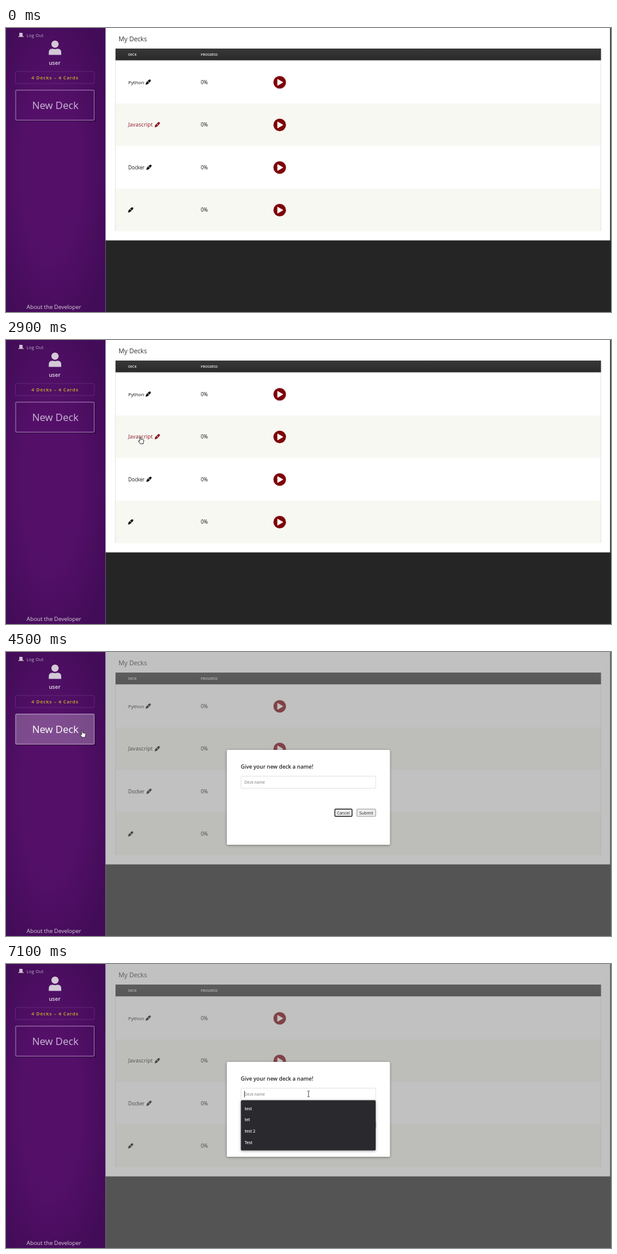
An HTML page for the animation above (7200 ms loop, 1000 by 470 pixels).

```html
<!DOCTYPE html>
<html lang="en">
<head>
<meta charset="utf-8">
<title>My Decks</title>
<style>
  html, body { margin: 0; width: 100%; height: 100%; overflow: hidden; background: #252525; }
  svg { display: block; width: 1000px; height: 470px; font-family: "Open Sans", sans-serif; }
  .mid { text-anchor: middle; }
  .bold { font-weight: 600; }
  .deck { fill: #111; }
  .deck.hover { fill: #8b0a1c; }
  #new rect { fill: #fff; fill-opacity: 0; stroke: #8c5f9d; stroke-width: 1.4; }
  #new text { fill: #ccb8d5; }
  #new.hover rect { fill-opacity: .25; stroke: #a582b2; }
  #new.hover text { fill: #fff; }
</style>
</head>
<body>
<svg viewBox="0 0 1000 470">
  <defs>
    <radialGradient id="purple" cx=".45" cy=".5" r=".62">
      <stop offset=".45" stop-color="#541069"/>
      <stop offset="1" stop-color="#430c58"/>
    </radialGradient>
    <linearGradient id="head" x2="0" y2="1">
      <stop stop-color="#383838"/>
      <stop offset="1" stop-color="#2a2a2c"/>
    </linearGradient>
    <filter id="shadow" x="-10%" y="-10%" width="120%" height="125%">
      <feDropShadow dx="0" dy="1" stdDeviation="2" flood-opacity=".4"/>
    </filter>
    <path id="pen" d="M-4.3 4.4 L-3.5 1 L-1.6-1.4 L1.6 1.6 L-.9 3.5 Z M-1-2 L2-4.2 Q3.4-4.7 4.2-3.6 Q4.8-2.7 4.1-1.7 L2.1 1 Z"/>
    <g id="play">
      <circle r="10.4" fill="#7d0308"/>
      <path d="M-3.4-5 L5.2 0 L-3.4 5 Z" fill="#fff" stroke="#fff" stroke-linejoin="round"/>
    </g>
  </defs>

  <rect x="164" width="836" height="470" fill="#252525"/>
  <rect x="164" width="834.5" height="351.5" fill="#fff"/>
  <text x="186" y="22" font-size="10.6" fill="#333">My Decks</text>
  <g id="table"></g>

  <rect width="164.5" height="470" fill="url(#purple)"/>
  <path d="M164.5 352V470" stroke="#77677d" stroke-width=".8"/>
  <path d="M20.5 14.3V13.4H22V8H27.4V13.4H29.3V14.8H20.5Z" fill="#cfc0d5"/>
  <text x="34" y="14.5" font-size="7" letter-spacing=".35" fill="#c5b2cd">Log Out</text>
  <g fill="#d4c8d9">
    <circle cx="81" cy="26.7" r="6"/>
    <path d="M70.7 44.6V40.5Q70.7 34.2 77 34.2Q81 35.8 85 34.2Q91.3 34.2 91.3 40.5V44.6Z"/>
  </g>
  <text class="mid bold" x="80.5" y="61" font-size="9" fill="#e4dce7">user</text>
  <rect x="15.5" y="72" width="130.5" height="20" rx="1.5" fill="none" stroke="#6a2d80" stroke-width=".8"/>
  <text class="mid bold" x="81" y="85.2" font-size="7.8" letter-spacing=".8" fill="#cdb923">4 Decks – 4 Cards</text>
  <g id="new">
    <path d="M17 154H147.7V104" fill="none" stroke="#2c063c" stroke-opacity=".55" stroke-width="1.8"/>
    <rect x="16" y="102.7" width="129.7" height="49.8" rx="2"/>
    <text class="mid" x="81.5" y="133.7" font-size="16.6">New Deck</text>
  </g>
  <text x="34" y="465" font-size="9.4" fill="#d8cddd">About the Developer</text>

  <g id="dialog">
    <rect x="164.5" width="835.5" height="470" fill="#848484" fill-opacity=".5"/>
    <rect x="365" y="162" width="269.5" height="157" rx="2" fill="#fff" filter="url(#shadow)"/>
    <text class="bold" x="388" y="193" font-size="8.9" fill="#222">Give your new deck a name!</text>
    <rect x="388.5" y="205.5" width="222.5" height="20" rx="1" fill="#fff" stroke="#e2e2e2"/>
    <text x="394" y="218" font-size="6.5" fill="#777">Deck name</text>
    <rect x="543.5" y="260" width="28.5" height="12" rx="1.5" fill="#efefef" stroke="#222" stroke-width="1.4"/>
    <text class="mid" x="557.5" y="268.6" font-size="6.8" fill="#222">Cancel</text>
    <rect x="580" y="260" width="31" height="12" rx="1" fill="#efefef" stroke="#888" stroke-width=".9"/>
    <text class="mid" x="595.5" y="268.6" font-size="6.9" fill="#222">Submit</text>
    <path id="caret" d="M394.2 210V220.5" stroke="#222" stroke-width=".9"/>
    <g id="menu"><rect x="388.3" y="225.5" width="222.7" height="83" rx="1.5" fill="#292a2d" filter="url(#shadow)"/></g>
  </g>

  <g id="cursor" stroke-linejoin="round">
    <path id="arrow" d="M0 0V9.2L2 7.4L3.4 10.2L4.7 9.6L3.4 6.8H6Z" fill="#fff" stroke="#222" stroke-width=".9"/>
    <path id="hand" d="M-.9 .8Q0-.5 .9 .8V4.3L5 5Q6 5.4 5.8 7L5 9.7V11.7H-.2L-3.2 7.6Q-3.2 6.2-1.9 6.8L-.9 7.7Z" fill="#fff" stroke="#222" stroke-width=".9"/>
    <path id="beam" d="M-1.8-4.8H-.5L0-4.3L.5-4.8H1.8M0-4.3V4.3M-1.8 4.8H-.5L0 4.3L.5 4.8H1.8" fill="none" stroke="#333" stroke-width=".9"/>
  </g>
</svg>
<script>
const LOOP = 7200, STEP = 100, OPEN = 4500, FOCUS = 5600;
const $ = id => document.getElementById(id);
const show = (id, on) => $(id).setAttribute("visibility", on ? "inherit" : "hidden");

// name, pen x, text size, letter spacing
const decks = [["Python", 235, 8, 0], ["Javascript", 250, 8.5, .3], ["Docker", 236.3, 8.2, 0], ["", 206, 8, 0]];
const rowY = i => 89.5 + i * 70.5;

$("table").innerHTML = decks.map(([name, penX, size, gap], i) => {
  const y = rowY(i);
  return `<rect x="181" y="${y - 35.2}" width="802" height="70.5" fill="${i % 2 ? "#f7f8f2" : "#fff"}"/>
    <g class="deck"><text x="202" y="${y + 3}" font-size="${size}" letter-spacing="${gap}">${name}</text>
    <use href="#pen" x="${penX}" y="${y}"/></g>
    <text x="322" y="${y + 3}" font-size="8.4" fill="#111">0%</text>
    <use href="#play" x="452.4" y="${y + .4}"/>`;
}).join("") + `<path d="M180.8 53V336M983.2 53V336" stroke="#ddd" stroke-width=".8"/>
  <rect x="181" y="34" width="802.5" height="19.5" fill="url(#head)"/>
  <g class="bold" font-size="5.5" fill="#eee"><text x="202" y="45.8">DECK</text><text x="322" y="45.8">PROGRESS</text></g>`;

$("menu").innerHTML += ["test", "tet", "test 2", "Test"].map((word, i) =>
  `<text class="bold" x="394.5" y="${241.6 + i * 18.7}" font-size="6.5" fill="#f2f2f2">${word}</text>`).join("");

// time, x, y of the pointer tip
const path = [[0, 222, 163], [400, 222, 163], [1100, 560, 215], [1300, 560, 215], [1500, 632, 236], [1800, 632, 236],
  [2000, 318, 184], [2600, 235, 166], [2900, 222, 160], [3400, 209.5, 95.5], [4200, 126, 129.5], [4500, 126, 129.5], [5300, 500, 215]];

function pointer(t) {
  const i = path.findIndex(key => key[0] > t);
  if (i < 0) return path.at(-1).slice(1);
  const [t0, x0, y0] = path[i - 1], [t1, x1, y1] = path[i];
  const u = (t - t0) / (t1 - t0), e = u * u * (3 - 2 * u);
  return [x0 + (x1 - x0) * e, y0 + (y1 - y0) * e];
}

const deckEls = document.querySelectorAll(".deck");

function draw(t) {
  const [x, y] = pointer(t), open = t >= OPEN;
  const inside = (l, top, r, b) => x > l && x < r && y > top && y < b;

  const overNew = inside(15, 102, 146, 153);
  $("new").classList.toggle("hover", overNew);
  let link = overNew;
  decks.forEach(([, penX], i) => {
    const over = !open && inside(201, rowY(i) - 7, penX + 5, rowY(i) + 7);
    deckEls[i].classList.toggle("hover", over);
    link ||= over || !open && Math.hypot(x - 452, y - rowY(i)) < 10;
  });

  const typing = open && inside(388, 205, 611, 226);
  show("dialog", open);
  show("menu", t >= FOCUS);
  show("caret", t >= FOCUS && (t < 6200 || t >= 6700));
  show("cursor", t >= 400);
  show("hand", link);
  show("beam", typing);
  show("arrow", !link && !typing);
  $("cursor").setAttribute("transform", `translate(${x} ${y})`);
}

const start = performance.now();
function tick() {
  const t = (performance.now() - start) % LOOP;
  draw(Math.floor(t / STEP) * STEP);
  requestAnimationFrame(tick);
}
tick();
</script>
</body>
</html>
```
